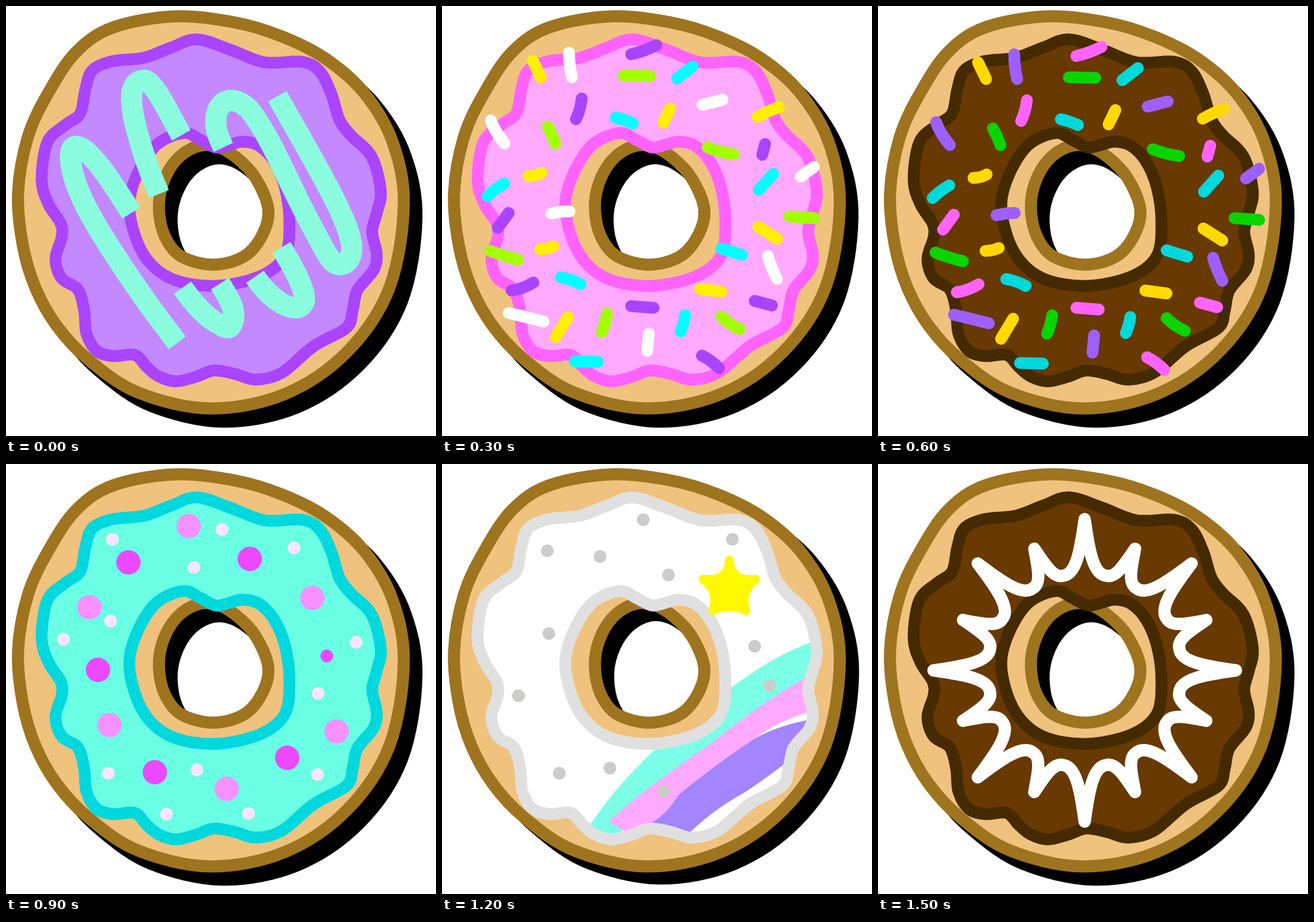
An HTML page with a canvas for the animation above (1.8 s loop, 748x748 px).

```html
<!DOCTYPE html>
<html lang="en">
<head>
<meta charset="utf-8">
<title>Donuts</title>
<style>
html, body { margin: 0; height: 100%; overflow: hidden; background: #fff; }
canvas { display: block; width: 100vmin; height: 100vmin; }
</style>
</head>
<body>
<canvas width="748" height="748"></canvas>
<script>
const ctx = document.querySelector('canvas').getContext('2d');

// Smooth closed curve through points given as "x,y x,y ..."
function loop(text) {
  const pts = text.split(' ').map(p => p.split(',').map(Number));
  const n = pts.length, path = new Path2D();
  path.moveTo(...pts[0]);
  pts.forEach((b, i) => {
    const a = pts[(i + n - 1) % n], c = pts[(i + 1) % n], d = pts[(i + 2) % n];
    path.bezierCurveTo(
      b[0] + (c[0] - a[0]) / 6, b[1] + (c[1] - a[1]) / 6,
      c[0] - (d[0] - b[0]) / 6, c[1] - (d[1] - b[1]) / 6, ...c);
  });
  path.closePath();
  return path;
}

function ring(outer, hole) {
  const path = loop(outer);
  path.addPath(loop(hole));
  return path;
}

const dough = ring(
  '295,18 187,37 122,80 73,152 38,228 21,325 29,415 51,490 88,556 142,614 229,672 355,700 485,675 594,601 667,490 692,345 672,235 622,150 555,91 480,53 400,29',
  '266,352 273,308 296,268 330,245 365,244 400,263 434,299 456,352 447,396 415,435 360,450 304,435 276,400');

const icing = ring(
  '332,58 288,72 240,90 185,96 150,112 138,145 129,187 103,207 72,237 62,303 74,345 95,378 97,402 86,440 97,474 125,493 136,530 140,570 158,600 187,609 224,607 245,628 265,644 295,653 330,645 362,634 398,640 435,650 480,638 535,592 592,560 603,530 611,495 639,460 645,432 637,393 645,360 652,322 636,262 600,225 580,198 566,153 546,114 515,97 450,98 390,76',
  '215,358 225,300 260,243 308,221 338,233 365,246 390,241 412,236 440,243 466,270 485,315 493,375 485,435 440,471 360,487 285,473 238,430');

function fill(path, color) {
  ctx.fillStyle = color;
  ctx.fill(path, 'evenodd');
}

function stroke(path, color, width, cap = 'round') {
  ctx.strokeStyle = color;
  ctx.lineWidth = width;
  ctx.lineCap = cap;
  ctx.lineJoin = 'round';
  ctx.stroke(path);
}

function dots(color, radius, text) {
  ctx.fillStyle = color;
  for (const p of text.split(' ')) {
    ctx.beginPath();
    ctx.arc(...p.split(','), radius, 0, 7);
    ctx.fill();
  }
}

const drizzle = new Path2D(
  'M218 360C190 315 145 243 121 244C106 246 111 285 128 325C150 380 235 505 298 586' +
  'M305 225C285 190 258 130 240 129C208 132 218 180 228 218C240 265 255 300 266 327' +
  'M378 246C368 225 362 210 366 190C371 160 400 155 425 182C462 230 490 305 532 383C555 425 565 450 580 450C600 450 605 425 599 405C590 360 530 260 472 157' +
  'M479 420C500 455 522 495 519 512C514 538 470 525 433 471' +
  'M372 483C388 508 398 525 396 542C392 565 385 562 370 553C345 540 325 515 307 490');

const sprinkles = [
  'M158 95L172 124M549 193Q568 182 586 176M397 178L385 203M150 296Q163 296 173 290M550 384L583 405M171 423Q183 423 194 418M449 492L486 497M219 541L198 576',
  'M221 81Q221 102 226 124M85 199Q92 219 109 239M453 172L488 163M647 280L624 297M190 361Q206 357 222 357M567 435Q572 454 583 475M116 534Q146 541 177 549M360 570L357 600',
  'M329 84Q351 79 373 68M243 161Q241 180 233 197M562 240L557 259M116 360L97 386M121 495Q141 492 159 481M329 522L368 525M544 513L574 521M452 608Q468 616 482 630',
  'M316 121L362 122M184 210Q192 224 197 239M462 246Q484 255 508 258M604 366L647 369M84 426Q107 435 132 441M287 535Q285 551 278 567M486 540Q500 554 518 562',
  'M436 105L409 126M302 194Q316 197 332 204M576 292L551 320M108 309Q91 319 79 331M486 422L522 433M207 472Q225 475 241 484M423 538Q421 552 415 566M231 618L271 619'
].map(d => new Path2D(d));

function sprinkle(colors) {
  sprinkles.forEach((path, i) => stroke(path, colors[i], 20.5));
}

const bands = [
  ['#7cffe6', 'M248 642Q296 566 370 497Q480 400 560 350Q600 325 655 305V375L480 510L300 648Z'],
  ['#ffa9ff', 'M290 622Q345 570 470 485Q550 418 650 361V428Q580 448 545 477L400 640H320Z'],
  ['#a285ff', 'M363 625Q392 609 411 576Q470 527 545 477Q586 454 645 444V500L598 520Q550 557 520 575Q465 606 422 650H365Z']
].map(([color, d]) => [color, new Path2D(d)]);

const star = new Path2D(
  'M500 167Q503 206 546 200Q517 224 529 255Q500 243 471 255Q483 224 454 200Q497 206 500 167Z');

// Sixteen spikes, long and short in turn, around the hole
function sunburst() {
  const path = new Path2D();
  const at = (r, deg) => {
    const a = deg * Math.PI / 180;
    return [359.5 + r * Math.sin(a), 359 - r * Math.cos(a)];
  };
  const curve = (...polar) => path.bezierCurveTo(...polar.flatMap(p => at(...p)));
  path.moveTo(...at(263, 0));
  for (let a = 0; a < 360; a += 45) {
    const b = a + 45;
    curve([210, a + 2], [167, a + 5], [169, a + 13]);
    curve([169, a + 18.5], [195, a + 20.5], [229, a + 22.5]);
    curve([195, b - 20.5], [169, b - 18.5], [169, b - 13]);
    curve([167, b - 5], [210, b - 2], [263, b]);
  }
  path.closePath();
  return path;
}
const spikes = sunburst();

const donuts = [
  {
    icing: '#c488ff', edge: '#aa44ff',
    top() { stroke(drizzle, '#8bfcde', 37, 'butt'); }
  },
  {
    icing: '#ffa9ff', edge: '#ff63ff',
    top() { sprinkle(['#fff000', '#fff', '#aa44ff', '#a4ff00', '#0ff']); }
  },
  {
    icing: '#683900', edge: '#452a00',
    top() {
      ctx.translate(16, 3);
      sprinkle(['#ffd900', '#9f5fff', '#ff63ff', '#09d400', '#00d8dc']);
    }
  },
  {
    icing: '#6affe4', edge: '#00d8dd',
    top() {
      dots('#f791ff', 21.2, '318,108 145,249 533,233 180,454 575,465 384,565');
      dots('#ec48ff', 21.2, '213,171 424,165 160,358 259,536 489,511');
      dots('#ec48ff', 11, '558,334');
      dots('#fde5ff', 11, '185,131 376,114 501,146 327,180 182,273 100,305 609,310 543,399 178,538 332,532 279,609 422,608 542,540');
    }
  },
  {
    icing: '#fff', edge: '#e0e0e0', shadow: [23, 21],
    under() {
      ctx.clip(icing, 'evenodd');
      for (const [color, path] of bands) fill(path, color);
    },
    top() {
      fill(star, '#fff900');
      stroke(star, '#fff900', 15);
      dots('#cdcccb', 11, '350,97 183,151 275,161 394,193 505,131 186,295 544,317 133,403 570,385 204,538 292,529 385,569');
    }
  },
  {
    icing: '#683900', edge: '#452a00',
    top() { stroke(spikes, '#fff', 21.5); }
  }
];

function isolated(draw) {
  ctx.save();
  draw();
  ctx.restore();
}

function drawDonut(donut) {
  ctx.fillStyle = '#fff';
  ctx.fillRect(0, 0, 748, 748);
  isolated(() => {
    ctx.translate(...(donut.shadow || [22, 23]));
    fill(dough, '#000');
    stroke(dough, '#000', 21);
  });
  fill(dough, '#efc27e');
  stroke(dough, '#9f741f', 21);
  fill(icing, donut.icing);
  if (donut.under) isolated(donut.under);
  stroke(icing, donut.edge, 20.5);
  isolated(donut.top);
}

function tick() {
  drawDonut(donuts[Math.floor(performance.now() / 300) % donuts.length]);
  requestAnimationFrame(tick);
}
tick();
</script>
</body>
</html>
```
